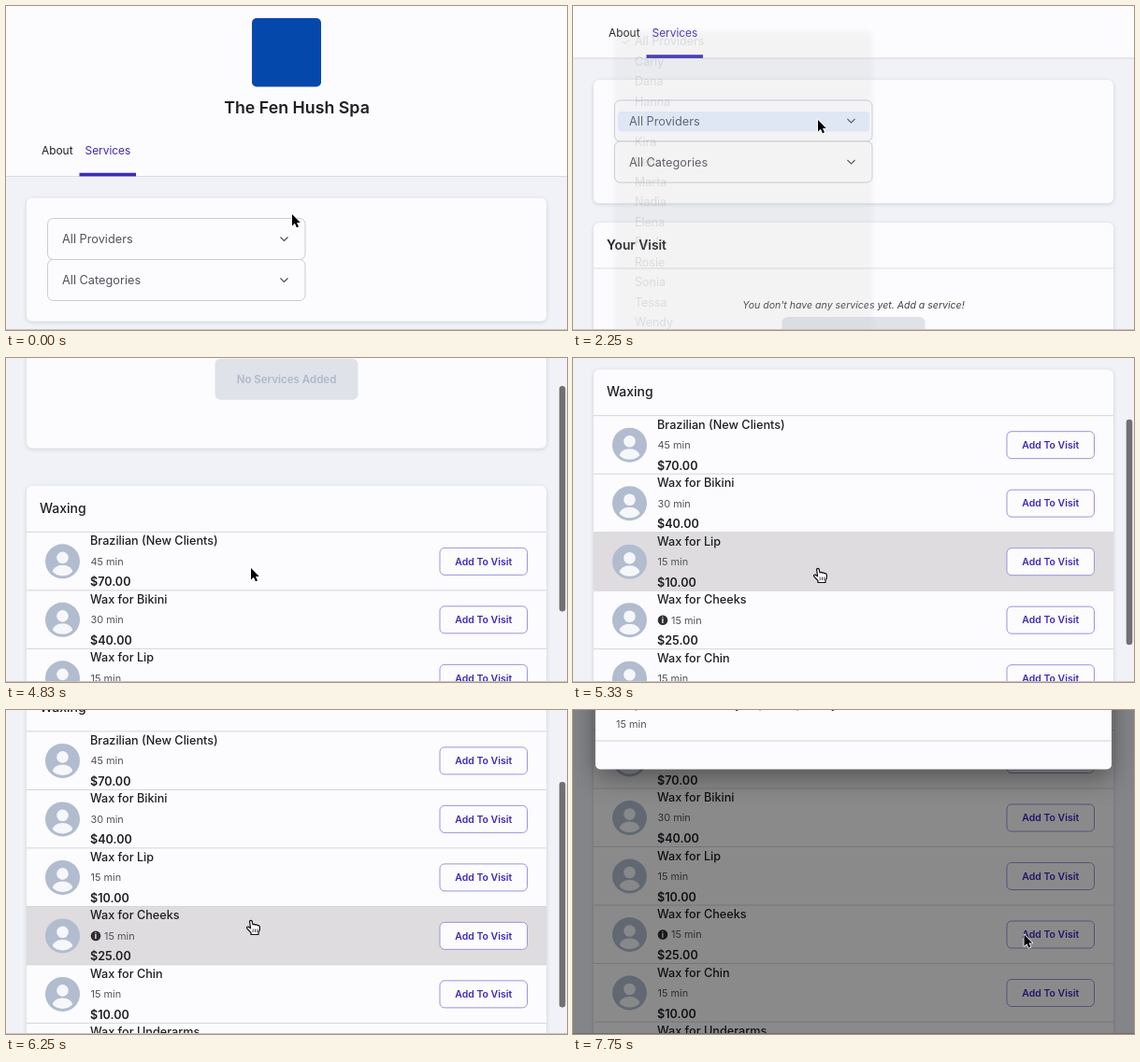
Recreate the animation shown at these times as an HTML page with a canvas. Size 600 by 347 pixels, loop 8000 ms.

```html
<!DOCTYPE html>
<html lang="en">
<head>
<meta charset="utf-8">
<title>Spa booking</title>
<style>
html, body { margin: 0; width: 100%; height: 100%; overflow: hidden; background: #f0f2f7; }
canvas { display: block; width: 600px; height: 347px; }
</style>
</head>
<body>
<canvas id="stage"></canvas>
<script>
const W = 600, H = 347, LOOP = 8000, STEP = 1000 / 12;
const FONT = 'Inter, "Open Sans", sans-serif';
const INK = '#1f1f24', GREY = '#51545c', VIOLET = '#3b2bb8', PAPER = '#fcfbfd', LINE = '#dcdde3';
const PROVIDER = 'Elena';
const SERVICES = [
  ['Brazilian (New Clients)', 45, 70], ['Wax for Bikini', 30, 40], ['Wax for Lip', 15, 10],
  ['Wax for Cheeks', 15, 25, true], ['Wax for Chin', 15, 10], ['Wax for Underarms', 15, 25]
];
const MENU = ['All Providers', 'Carly', 'Dana', 'Hanna', 'Jodie', 'Kira', 'Lena', 'Marta', 'Nadia',
  PROVIDER, 'Paula', 'Rosie', 'Sonia', 'Tessa', 'Wendy'];
const ROW_H = 62.5, ROWS_TOP = 645, ITEM_H = 21.5, MENU_TOP = 27;

// [time, value, speed per second]
const SCROLL = [
  [790, 0, 0], [1167, 101.5, 140], [1700, 126.5, 0], [4167, 126.5, 0],
  [4833, 458.5, 430], [5750, 608.5, 39], [6450, 623.5, 0]
];
// [time, x, y] of the pointer tip
const POINTER = [
  [150, 306, 223], [650, 341, 225], [1480, 341, 225], [1830, 322, 188], [2200, 262, 122],
  [2600, 262, 122], [3170, 262, 225], [6500, 262, 225], [6950, 482.5, 240.5]
];

const canvas = document.getElementById('stage');
const ctx = canvas.getContext('2d');
const dpr = window.devicePixelRatio || 1;
canvas.width = W * dpr;
canvas.height = H * dpr;

const clamp = v => Math.max(0, Math.min(1, v));
const ramp = (t, a, b) => clamp((t - a) / (b - a));
const smooth = p => p * p * (3 - 2 * p);

function segment(keys, t) {
  let i = 0;
  while (i < keys.length - 2 && t >= keys[i + 1][0]) i++;
  const a = keys[i], b = keys[i + 1];
  return [a, b, ramp(t, a[0], b[0])];
}

function scrollAt(t) {
  const [a, b, p] = segment(SCROLL, t);
  const d = (b[0] - a[0]) / 1000, q = 1 - p;
  return a[1] * q * q * (1 + 2 * p) + b[1] * p * p * (3 - 2 * p)
    + d * (a[2] * p * q * q - b[2] * p * p * q);
}

function pointerAt(t) {
  const [a, b, p] = segment(POINTER, t), e = smooth(p);
  return [a[1] + (b[1] - a[1]) * e, a[2] + (b[2] - a[2]) * e];
}

// y is the middle of the capitals
function text(s, x, y, size, color, weight = 400, align = 'left', style = '') {
  ctx.font = `${style} ${weight} ${size}px ${FONT}`;
  ctx.textAlign = align;
  ctx.fillStyle = color;
  ctx.fillText(s, x, y + size * 0.36);
}

function rect(x, y, w, h, fill) {
  ctx.fillStyle = fill;
  ctx.fillRect(x, y, w, h);
}

function box(x, y, w, h, r, fill, stroke) {
  ctx.beginPath();
  ctx.roundRect(x, y, w, h, r);
  if (fill) { ctx.fillStyle = fill; ctx.fill(); }
  if (stroke) { ctx.strokeStyle = stroke; ctx.lineWidth = 1; ctx.stroke(); }
}

function disc(x, y, r, fill) {
  ctx.beginPath();
  ctx.arc(x, y, r, 0, Math.PI * 2);
  ctx.fillStyle = fill;
  ctx.fill();
}

function shadowed(color, blur, dy, draw) {
  ctx.save();
  ctx.shadowColor = color;
  ctx.shadowBlur = blur * dpr;
  ctx.shadowOffsetY = dy * dpr;
  draw();
  ctx.restore();
}

const card = (y, h) => shadowed('rgba(60,70,100,.2)', 4, 1, () => box(22, y, 556, h, 6, PAPER));

function select(label, y) {
  box(44.5, y, 275.5, 44, 6, PAPER, '#c9cdd6');
  text(label, 60, y + 22, 12.75, GREY);
  ctx.beginPath();
  ctx.moveTo(293.5, y + 20);
  ctx.lineTo(297.5, y + 24);
  ctx.lineTo(301.5, y + 20);
  ctx.strokeStyle = '#4a4d55';
  ctx.lineWidth = 1.1;
  ctx.stroke();
}

function avatar(x, y) {
  disc(x, y, 18.5, '#b1bccf');
  ctx.save();
  ctx.beginPath();
  ctx.arc(x, y, 15.5, 0, Math.PI * 2);
  ctx.clip();
  ctx.beginPath();
  ctx.ellipse(x, y + 12, 11, 8, 0, 0, Math.PI * 2);
  ctx.fillStyle = '#f6f7fa';
  ctx.fill();
  disc(x, y - 4, 7.8, '#b1bccf');
  disc(x, y - 4, 6.3, '#f6f7fa');
  ctx.restore();
}

function spinner(x, y, t) {
  const lead = Math.floor(t / STEP) % 8;
  for (let i = 0; i < 8; i++) {
    const a = i * Math.PI / 4;
    ctx.globalAlpha = 0.45 + 0.5 * ((i - lead + 8) % 8) / 7;
    disc(x + 5 * Math.cos(a), y + 5 * Math.sin(a), 0.9, '#50535f');
  }
  ctx.globalAlpha = 1;
}

function service([name, minutes, price, info], y, hovered, loading, t) {
  const mid = y + 31.5;
  if (hovered) rect(22, y, 556, ROW_H, '#dedcdf');
  rect(22, y - 0.5, 556, 1, '#d5d6dc');
  avatar(60.5, mid);
  text(name, 90, y + 9.5, 12.65, INK, 500);
  if (info) {
    disc(96, mid, 5.3, '#2d2d33');
    text('i', 96, mid, 8.5, '#fff', 700, 'center');
  }
  text(minutes + ' min', info ? 105 : 90.5, mid, 10.9, GREY);
  text(`$${price}.00`, 90, y + 53.5, 12.6, INK, 600);
  if (loading) {
    box(444, mid - 14.5, 113.5, 29, 5, '#dddfe8', '#b9b7e2');
    text('Add To Visit', 459.5, mid, 10.4, '#b0b5cb', 600);
    spinner(536.5, mid, t);
  } else {
    box(464, mid - 14.5, 93.5, 29, 5, PAPER, '#9b94dc');
    text('Add To Visit', 510.7, mid, 10.5, VIOLET, 600, 'center');
  }
}

function page(t, scroll) {
  rect(0, 0, W, H, '#f0f2f7');
  ctx.save();
  ctx.translate(0, -scroll);

  rect(0, 0, W, 182, PAPER);
  rect(0, 182, W, 1, '#d9dce3');
  box(263, 13, 74, 73.5, 5, '#0548ac');
  text('The Fen Hush Spa', 311, 109, 17.8, INK, 600, 'center');
  text('About', 38, 155, 11.9, INK);
  text('Services', 84.5, 155, 11.9, VIOLET);
  rect(78.5, 178.7, 60.5, 3.7, VIOLET);

  card(205.5, 132.3);
  select(t >= 3580 ? PROVIDER : 'All Providers', 227.5);
  select('All Categories', 271.5);

  card(358.5, 197);
  text('Your Visit', 36, 382.5, 13.8, INK, 600);
  rect(22, 407, 556, 1, LINE);
  text("You don't have any services yet. Add a service!", 300, 446.5, 10.55, '#3f4148', 400, 'center', 'italic');
  box(223.5, 459.5, 153, 44, 6, '#dfe2e9');
  text('No Services Added', 300, 481.5, 11.5, '#b0b8cb', 600, 'center');

  card(595.5, 500);
  text('Waxing', 36, 619.5, 14, INK, 500);
  const hover = t < 5170 || t >= 7500 ? -1 : t < 5830 ? 2 : 3;
  const loading = t >= 7050 && t < 7490;
  SERVICES.forEach((s, i) => service(s, ROWS_TOP + i * ROW_H, i === hover, loading, t));
  ctx.restore();
  rect(0, 346, W, 1, '#c3c4c8');
}

function menu(t, tipY) {
  const alpha = ramp(t, 2240, 2330) * (1 - ramp(t, 3500, 3660));
  if (!alpha) return;
  ctx.globalAlpha = alpha;
  shadowed('rgba(0,0,0,.3)', 5, 1, () => box(44, MENU_TOP - 1, 277, 360, 6, '#f4f4f6'));
  const active = Math.floor((tipY - MENU_TOP) / ITEM_H);
  MENU.forEach((name, i) => {
    const y = MENU_TOP + i * ITEM_H, on = i === active;
    if (on) box(48, y, 269, ITEM_H, 4, '#3f7ff0');
    const color = on ? '#fff' : '#26262b';
    if (i === 0) text('✓', 52, y + ITEM_H / 2, 11, color);
    text(name, 66, y + ITEM_H / 2, 12.5, color);
  });
  ctx.globalAlpha = 1;
}

function scrollbar(t, scroll) {
  const alpha = ramp(t, 4170, 4250) * (1 - ramp(t, 6660, 6920));
  if (!alpha) return;
  ctx.globalAlpha = alpha;
  box(591.7, 30 + (scroll - 458.5) * 0.287, 6.6, 241.5, 3.3, '#717174');
  ctx.globalAlpha = 1;
}

function modal(t) {
  const p = ramp(t, 7420, 7750);
  if (!p) return;
  rect(0, 0, W, H, `rgba(0,0,0,${0.45 * p})`);
  const bottom = 63.5 - 62 * (1 - p) * (1 - p);
  shadowed('rgba(0,0,0,.4)', 28, 9, () => box(24, bottom - 200, 552, 200, 5, PAPER));
  text('Step in a bit earlier if you prefer privacy', 46, bottom - 70, 12.6, INK, 500);
  text('15 min', 46, bottom - 48, 10.9, GREY);
  rect(24, bottom - 31, 552, 1, '#cbd1e6');
}

function arrow() {
  const path = new Path2D('M0 0V12.4L2.9 9.8L4.9 14.2L7 13.3L5 9H8.8Z');
  ctx.strokeStyle = '#fff';
  ctx.lineWidth = 1.6;
  ctx.stroke(path);
  ctx.fillStyle = '#000';
  ctx.fill(path);
}

function hand() {
  const path = new Path2D('M-1.5 1.2Q0-.5 1.2 1.2L2 5Q3.5 3.6 4.6 5.2Q6 4.2 7.2 5.8Q9 5.3 9.4 7.2V10.5L8 13V15.5H0V13.5L-4.3 8.8Q-4.8 6.8-2.7 7.2L-.4 8.8Z');
  ctx.fillStyle = '#fff';
  ctx.fill(path);
  ctx.strokeStyle = '#111';
  ctx.lineWidth = 1.2;
  ctx.stroke(path);
  ctx.beginPath();
  for (const x of [2.2, 4.5, 6.8]) { ctx.moveTo(x, 9.5); ctx.lineTo(x, 13); }
  ctx.lineWidth = 0.8;
  ctx.stroke();
}

function forbidden(x, y) {
  ctx.beginPath();
  ctx.arc(x, y, 6.6, 0, Math.PI * 2);
  ctx.moveTo(x - 4.6, y - 4.6);
  ctx.lineTo(x + 4.6, y + 4.6);
  ctx.strokeStyle = '#f5f5f5';
  ctx.lineWidth = 4;
  ctx.stroke();
  ctx.strokeStyle = '#77777b';
  ctx.lineWidth = 2;
  ctx.stroke();
}

function pointer(t, [x, y]) {
  ctx.save();
  ctx.translate(x, y);
  ctx.lineJoin = 'round';
  if (t >= 5170 && t < 7050) {
    hand();
  } else {
    arrow();
    if (t >= 7050 && t < 7490) forbidden(8.5, 20.5);
  }
  ctx.restore();
}

function draw(now) {
  const t = Math.min(Math.floor((now % LOOP) / STEP + 0.1) * STEP, 7750);
  const scroll = scrollAt(t), tip = pointerAt(t);
  ctx.setTransform(dpr, 0, 0, dpr, 0, 0);
  page(t, scroll);
  scrollbar(t, scroll);
  menu(t, tip[1]);
  modal(t);
  pointer(t, tip);
}

const start = performance.now();
function tick() {
  draw(performance.now() - start);
  requestAnimationFrame(tick);
}
tick();
</script>
</body>
</html>
```
